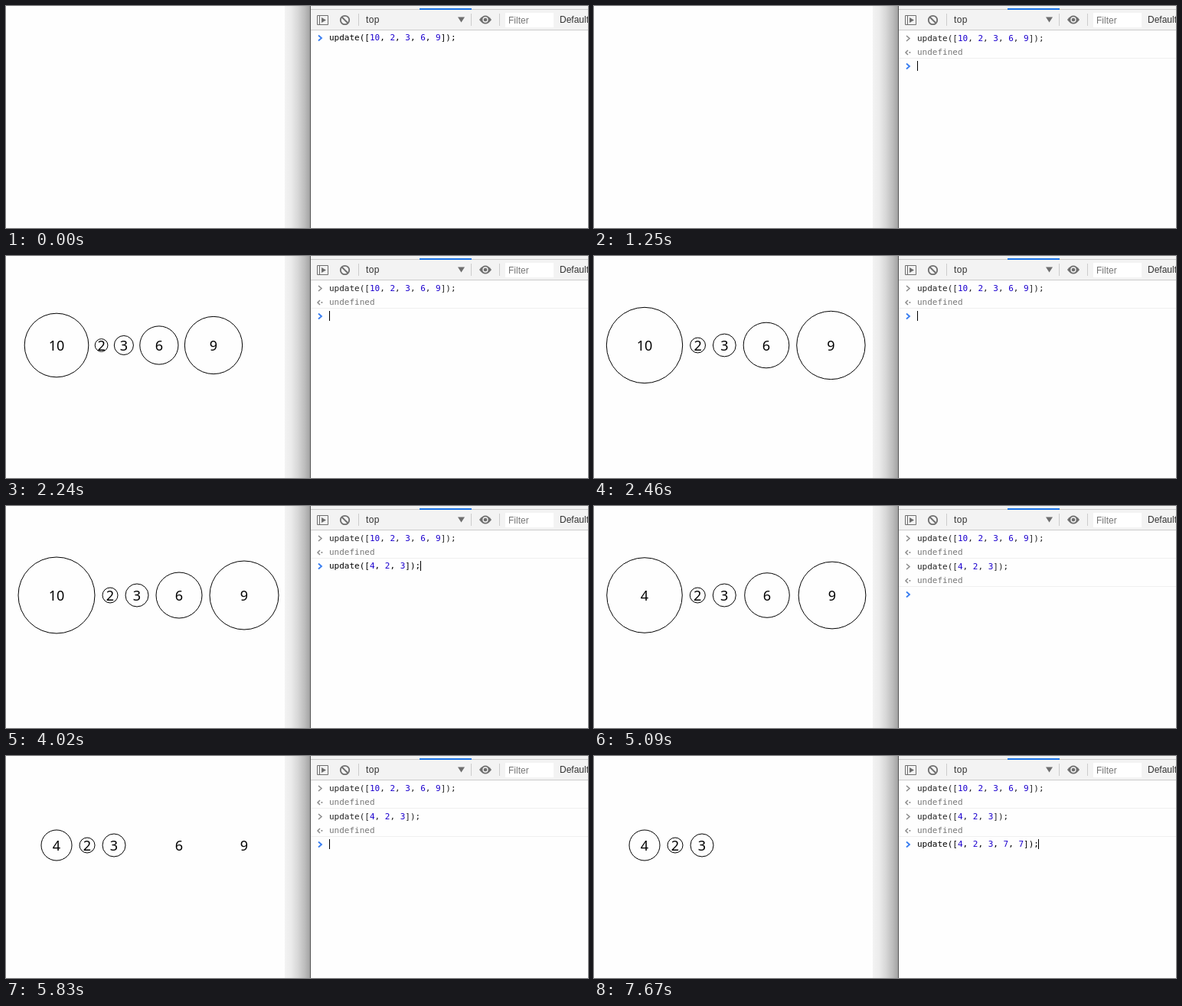
Write an HTML page that moves like this. It is 760 px wide and 291 px high and loops after 8 s.

```html
<!DOCTYPE html>
<html lang="en">
<head>
<meta charset="utf-8">
<title>Circle update demo</title>
<style>
  html, body { margin: 0; width: 100%; height: 100%; overflow: hidden; background: #fefefe; }
  svg { display: block; width: 760px; height: 291px; }
  text { white-space: pre; }
  .code { font: 11px "DejaVu Sans Mono", monospace; }
  .ui { font: 12px "Liberation Sans", sans-serif; fill: #333; }
  .number { fill: #1c00cf; }
  #circles text { font: 18px "Noto Sans", sans-serif; text-anchor: middle; }
  #circles circle { fill: none; stroke: #000; }
  .chevron { fill: none; stroke: #8a8a8a; stroke-width: 1.5; }
  .active { stroke: #367cf1; stroke-width: 1.8; }
</style>
</head>
<body>
<svg viewBox="0 0 760 291">
  <defs>
    <linearGradient id="shadow">
      <stop offset="0" stop-color="#f3f3f3"/>
      <stop offset=".25" stop-color="#ebebeb"/>
      <stop offset=".5" stop-color="#d9d9d9"/>
      <stop offset=".8" stop-color="#bcbcbc"/>
      <stop offset="1" stop-color="#a2a2a2"/>
    </linearGradient>
  </defs>
  <rect width="760" height="291" fill="#fefefe"/>
  <g id="circles"></g>

  <rect x="364" width="33" height="291" fill="url(#shadow)"/>
  <rect x="397" width="363" height="291" fill="#fefefe"/>
  <rect x="397" width="363" height="31" fill="#f3f3f3"/>
  <path d="M398 4.5H760M398 31.5H760M460.5 10V26M607.5 10V26M644.5 10V26" stroke="#ccc"/>
  <rect x="540" y="3" width="68" height="2" fill="#1a73e8"/>
  <rect x="397" width="1" height="291" fill="#555"/>

  <g fill="none" stroke="#6e6e6e">
    <path d="M406.5 12.5h14v12h-14zM409.5 12.5v12"/>
    <path d="M412 15l6 3.5l-6 3.5z" fill="#6e6e6e" stroke="none"/>
    <circle cx="442.5" cy="18.5" r="5.7" stroke-width="1.8"/>
    <path d="M438.5 14.5l8 8" stroke-width="1.8"/>
    <path d="M590 14.5h9l-4.5 7z" fill="#6e6e6e" stroke="none"/>
    <path d="M618 18q8 -11 16 0q-8 11 -16 0z" fill="#6e6e6e" stroke="none"/>
    <circle cx="626" cy="18" r="3" fill="#6e6e6e" stroke="#f3f3f3" stroke-width="1.3"/>
  </g>
  <text class="ui" x="470" y="22" letter-spacing=".4">top</text>
  <rect x="652" y="9" width="63" height="19" fill="#fff"/>
  <text class="ui" x="656" y="23" style="fill:#757575">Filter</text>
  <text class="ui" x="723" y="22">Default</text>

  <g id="log"></g>
  <rect id="caret" width="1" height="13"/>
</svg>
<script>
const LOOP = 8000, DURATION = 970;
const TEXT_X = 422, CHAR_W = 6.623, ROW_H = 37;
const FIRST_X = 66, CENTER_Y = 117, GAP = 10, UNIT = 5;

const BIG = [10, 2, 3, 6, 9], SHORT = [4, 2, 3], LONG = [4, 2, 3, 7, 7];
const INPUT = [
  [0, BIG], [1190, null], [2520, BIG], [2940, SHORT], [3480, LONG], [4020, SHORT],
  [4440, null], [6050, SHORT], [6710, BIG], [7190, SHORT], [7670, LONG]
];
const COMMITS = [[1190, BIG], [4440, SHORT]];
const CARET_ON = [[350, 890], [1190, 1690], [2200, 4960], [5470, 5990], [6050, LOOP]];
const GROW = 1605, SHRINK = 4914;

const $ = id => document.getElementById(id);
const command = values => `update([${values.join(", ")}]);`;
const lerp = (a, b, p) => a + (b - a) * p;

function ease(u) {
  u = Math.min(1, Math.max(0, u));
  return u < .5 ? 4 * u ** 3 : 1 - 4 * (1 - u) ** 3;
}

// Lays circles side by side, with the first one fixed in place.
function layout(values) {
  let x = FIRST_X - values[0] * UNIT;
  return values.map(value => {
    const r = value * UNIT, item = { value, r, x: x + r };
    x += 2 * r + GAP;
    return item;
  });
}
const before = layout(BIG), after = layout(SHORT);

function circlesAt(t) {
  if (t < GROW) return [];
  if (t < SHRINK) {
    const p = ease((t - GROW) / DURATION);
    return before.map(c => ({ value: c.value, r: c.r * p, x: lerp(FIRST_X, c.x, p) }));
  }
  const p = ease((t - SHRINK) / DURATION);
  const visible = t < SHRINK + DURATION - 5 ? before : before.slice(0, after.length);
  return visible.map((c, i) => {
    const end = after[i] || { ...c, r: 0 };
    return { value: end.value, r: lerp(c.r, end.r, p), x: lerp(c.x, end.x, p) };
  });
}

const circleMarkup = ({ value, r, x }) =>
  (r > .2 ? `<circle cx="${x}" cy="${CENTER_Y}" r="${r}"/>` : "") +
  `<text x="${x}" y="123.5">${value}</text>`;

const chevron = (y, kind = "") =>
  `<path class="chevron ${kind}" d="M408 ${y - 3.5}l4 3.5l-4 3.5"/>`;

const codeLine = (values, y, color) =>
  `<text class="code" x="${TEXT_X}" y="${y}" fill="${color}">` +
  command(values).replace(/\d+/g, '<tspan class="number">$&</tspan>') + "</text>";

function committedRow(values, y) {
  return chevron(y + 10.5) + codeLine(values, y + 14, "#222") +
    `<path class="chevron" stroke-width="1.2" d="M410 ${y + 26}l-3 3l3 3"/>` +
    `<rect x="411.5" y="${y + 28}" width="1.8" height="1.8" fill="#8a8a8a"/>` +
    `<text class="code" x="${TEXT_X}" y="${y + 32}" fill="#777">undefined</text>` +
    `<rect x="398" y="${y + 36}" width="362" height="1" fill="#f0f0f0"/>`;
}

function render(t) {
  $("circles").innerHTML = circlesAt(t).map(circleMarkup).join("");

  const done = COMMITS.filter(([time]) => t >= time);
  const values = INPUT.filter(([time]) => t >= time).pop()[1];
  const y = 32 + done.length * ROW_H;
  $("log").innerHTML =
    done.map(([, list], i) => committedRow(list, 32 + i * ROW_H)).join("") +
    chevron(y + 10, "active") + (values ? codeLine(values, y + 13, "#000") : "");

  const caret = $("caret");
  const length = values ? command(values).length : 0;
  caret.setAttribute("x", Math.floor(TEXT_X + length * CHAR_W));
  caret.setAttribute("y", y + 3);
  caret.style.display = CARET_ON.some(([on, off]) => t >= on && t < off) ? "" : "none";
}

const start = performance.now();
function tick() {
  render((performance.now() - start) % LOOP);
  requestAnimationFrame(tick);
}
tick();
</script>
</body>
</html>
```
